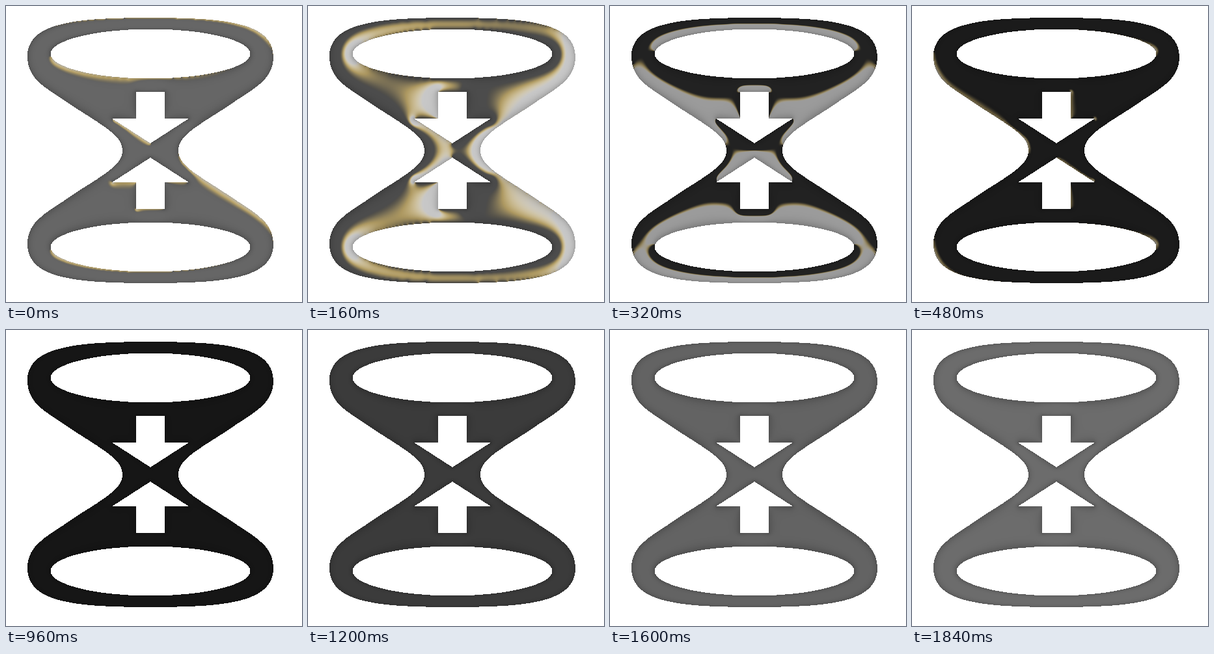
These frames come from a looping animation (455x455 px, 1920 ms). An HTML page with a canvas:

```html
<!DOCTYPE html>
<html lang="en">
<head>
<meta charset="utf-8">
<title>Chrome hourglass</title>
<style>
  html, body { margin: 0; width: 100%; height: 100%; overflow: hidden; background: #fff; }
  canvas { display: block; }
</style>
</head>
<body>
<canvas id="stage" width="455" height="455"></canvas>
<script>
const SIZE = 455, LOOP = 1920, STEP = 80;
const ctx = document.getElementById('stage').getContext('2d', { willReadFrequently: true });

// Hourglass outline with two ring holes and two arrows cut out
const left = 'C108 18 33 25 33 78 C33 114 64 127 100 152 C148 184 179 198 179 222' +
  ' C179 246 148 260 100 292 C64 317 33 330 33 366 C33 419 108 426 222 426';
const right = 'C336 426 411 419 411 366 C411 330 380 317 344 292 C296 260 265 246 265 222' +
  ' C265 198 296 184 344 152 C380 127 411 114 411 78 C411 25 336 18 222 18Z';
const shape = new Path2D('M222 18' + left + right +
  'M200 132H244V173H281L222 211L163 173H200Z' +
  'M200 312H244V271H281L222 233L163 271H200Z');
for (const y of [73.5, 370.5]) {
  shape.moveTo(375.5, y);
  shape.ellipse(222, y, 153.5, 38, 0, 0, 2 * Math.PI);
}
ctx.fill(shape, 'evenodd');

const image = ctx.getImageData(0, 0, SIZE, SIZE);
const inside = [];
for (let i = 0; i < SIZE * SIZE; i++) {
  if (image.data[4 * i + 3] > 127) inside.push(i);
}
image.data.fill(255);

// Inflate the shape: solve laplace(h) = -1 with h = 0 at the edge
const h = new Float32Array(SIZE * SIZE);
for (let pass = 0; pass < 120; pass++) {
  for (const i of inside) {
    const mean = (h[i - 1] + h[i + 1] + h[i - SIZE] + h[i + SIZE] + 1) / 4;
    h[i] += 1.9 * (mean - h[i]);
  }
}
const normals = inside.map(i => {
  const gx = (h[i - 1] - h[i + 1]) / 2;
  const gy = (h[i - SIZE] - h[i + SIZE]) / 2;
  const len = Math.sqrt(2 * h[i] + gx * gx + gy * gy) || 1;
  return [gx / len, gy / len];
});

// time, body grey, reflection grey, softness of the gold seam, light angle
const keys = [
  [0, 102, 215, .2, -58], [160, 76, 200, .24, 4], [320, 34, 155, .09, 90],
  [480, 27, 150, .18, 150], [560, 22, 140, .12, 180], [960, 22, 140, .12, 180],
  [1360, 84, 140, .12, 180], [1680, 104, 140, .12, 180], [1840, 108, 140, .12, 180],
  [1920, 102, 215, .2, 302]
];

function sample(t) {
  const n = keys.findIndex(k => k[0] > t);
  const a = keys[n - 1], b = keys[n];
  const p = (t - a[0]) / (b[0] - a[0]);
  return a.map((v, j) => v + (b[j] - v) * p);
}

function draw(t) {
  const [, body, light, soft, degrees] = sample(t);
  const angle = degrees * Math.PI / 180;
  const dx = Math.cos(angle), dy = Math.sin(angle);
  const swing = Math.sin((Math.min(t, 560) - 240) / 320 * Math.PI / 2);
  const edge = t < 720 ? swing ** 4 : 9;

  inside.forEach((i, n) => {
    const [nx, ny] = normals[n];
    const r2 = nx * nx + ny * ny;
    const limit = edge + .3 * r2 * (1 - edge);
    const x = (nx * dx + ny * dy - limit) / soft;
    const m = Math.max(0, Math.min(1, (x + 1) / 2));
    const mix = m * m * (3 - 2 * m);
    const gold = t < 720 ? Math.max(0, 1 - Math.abs(x)) : 0;
    const shade = 1 - .22 * r2 * r2;
    const v = (body + (light - body) * mix) * shade;
    image.data[4 * i] = v * (1 + .25 * gold);
    image.data[4 * i + 1] = v * (1 + .1 * gold);
    image.data[4 * i + 2] = v * (1 - .3 * gold);
  });
  ctx.putImageData(image, 0, 0);
}

let shown = -1;
function tick(now) {
  const t = Math.floor(now % LOOP / STEP) * STEP;
  if (t !== shown) draw(shown = t);
  requestAnimationFrame(tick);
}
draw(0);
requestAnimationFrame(tick);
</script>
</body>
</html>
```
